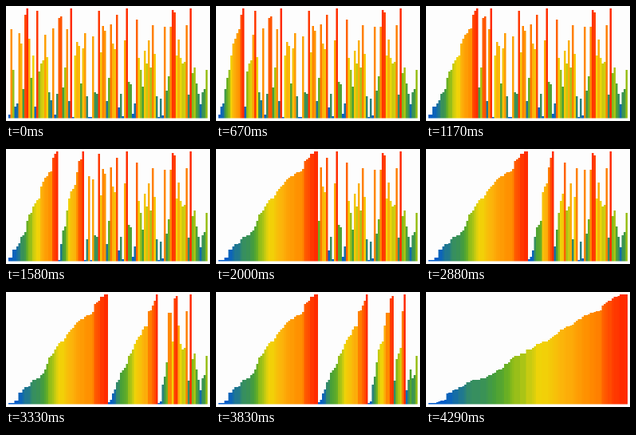
These frames come from a looping animation (256 px wide and 144 px high, 4.33 s). An HTML page with a canvas:

```html
<!DOCTYPE html>
<html lang="en">
<head>
<meta charset="utf-8">
<title>Merge sort</title>
<style>
html, body { margin: 0; width: 100%; height: 100%; overflow: hidden; background: #fdfdfd; }
canvas { display: block; width: 256px; height: 144px; }
</style>
</head>
<body>
<canvas id="stage" width="512" height="288"></canvas>
<script>
const ctx = document.getElementById('stage').getContext('2d');
const LOOP = 4330, FPS = 24, BASE = 140.5, LEFT = 3, BAR = 2.5;

// Top edge of each bar, in stage pixels
const tops = [
  136, 29, 80, 126, 122, 34, 47, 104, 11, 3,
  41, 90, 62, 126, 6, 82, 72, 68, 36, 64,
  108, 118, 28, 136, 110, 15, 13, 102, 77, 29,
  119, 3, 139, 62, 45, 50, 97, 53, 34, 113,
  139, 139, 38, 108, 110, 6, 58, 25, 31, 119,
  90, 23, 47, 54, 11, 127, 110, 138, 43, 3,
  95, 98, 135, 122, 17, 65, 80, 101, 56, 72,
  43, 77, 24, 60, 113, 139, 116, 137, 26, 106,
  88, 26, 5, 8, 62, 42, 65, 72, 70, 24,
  111, 3, 84, 77, 97, 110, 123, 108, 104, 80
];

// Bar height -> colour
const ramp = [
  [0, 0, 90, 205], [15, 12, 100, 185], [28, 50, 138, 105],
  [40, 72, 160, 55], [54, 115, 180, 30], [66, 185, 200, 20],
  [76, 240, 212, 8], [95, 252, 178, 10], [113, 255, 142, 0],
  [127, 255, 85, 0], [138, 255, 42, 0]
];

function colour(h) {
  let i = 1;
  while (i < ramp.length - 1 && ramp[i][0] < h) i++;
  const a = ramp[i - 1], b = ramp[i];
  const t = Math.min(1, (h - a[0]) / (b[0] - a[0]));
  const mix = n => Math.round(a[n] + (b[n] - a[n]) * t);
  return `rgb(${mix(1)},${mix(2)},${mix(3)})`;
}

// Top-down merge sort; keeps the array after every merge
const states = [];
function sort(list, lo, hi) {
  if (lo >= hi) return;
  const mid = (lo + hi) >> 1;
  sort(list, lo, mid);
  sort(list, mid + 1, hi);
  const merged = list.slice(lo, hi + 1).sort((a, b) => b - a);
  list.splice(lo, merged.length, ...merged);
  states.push(list.slice());
}
sort(tops.slice(), 0, tops.length - 1);

// Steps start on a 10 ms grid
const start = k => Math.round(k * 100 / FPS) * 10;
function stepAt(t) {
  let k = Math.floor(t * FPS / 1000) + 1;
  while (start(k) > t) k--;
  return Math.min(k, states.length - 1);
}

function draw(list) {
  ctx.setTransform(2, 0, 0, 2, 0, 0);
  ctx.fillStyle = '#fdfdfd';
  ctx.fillRect(0, 0, 256, 144);
  list.forEach((y, i) => {
    ctx.fillStyle = colour(BASE - y);
    ctx.fillRect(LEFT + i * BAR, y, BAR, BASE - y);
  });
}

const t0 = performance.now();
function tick() {
  draw(states[stepAt((performance.now() - t0) % LOOP)]);
  requestAnimationFrame(tick);
}
tick();
</script>
</body>
</html>
```
